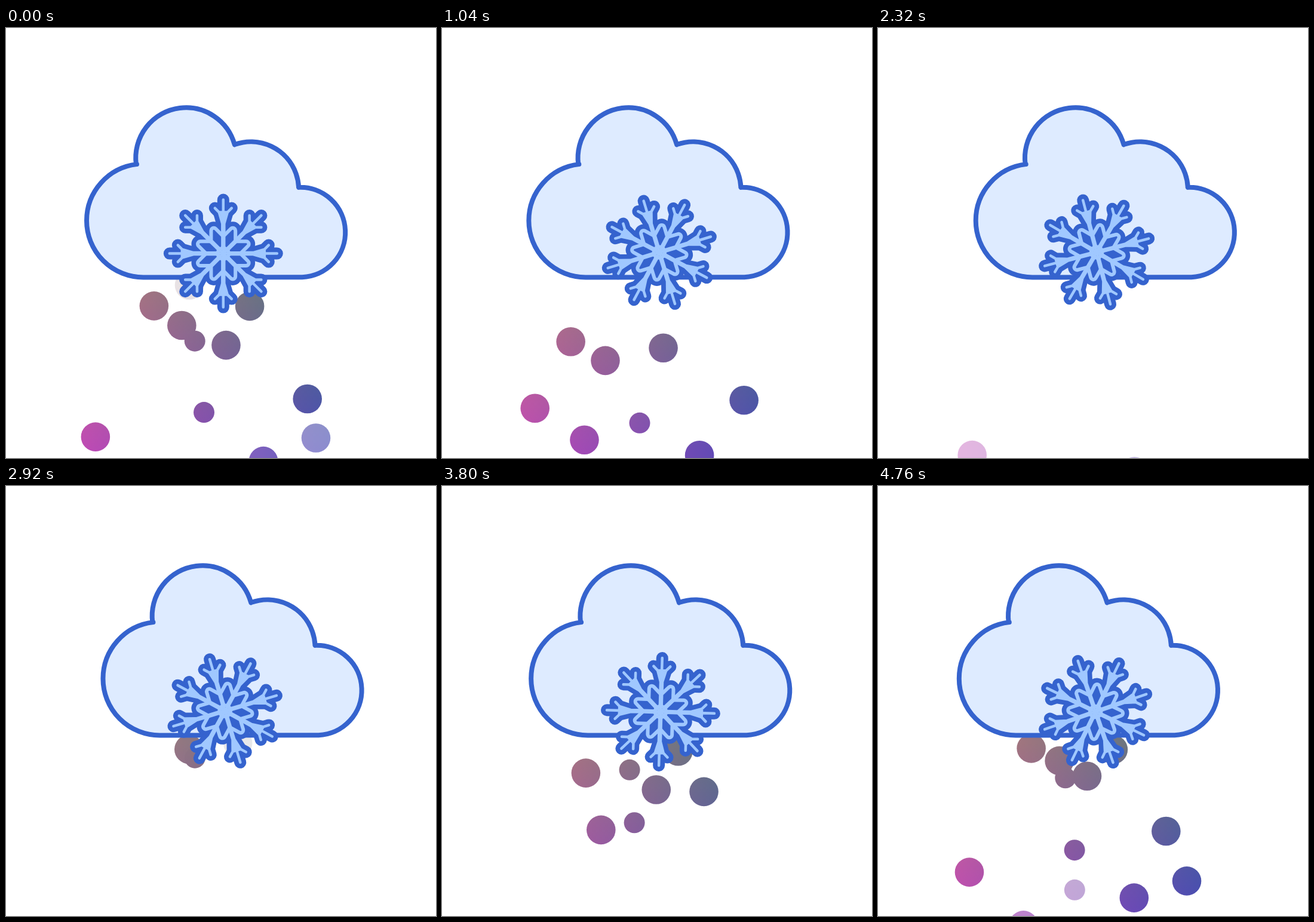
Write an HTML page with a canvas that moves like this. It is 720x720 px and loops after 4800 ms.

```html
<!DOCTYPE html>
<html lang="en">
<head>
<meta charset="utf-8">
<title>Snow cloud</title>
<style>
html, body { margin: 0; width: 100%; height: 100%; overflow: hidden; background: #fff; }
canvas { display: block; width: 720px; height: 720px; }
</style>
</head>
<body>
<canvas id="stage" width="720" height="720"></canvas>
<script>
const SIZE = 720, LOOP = 4800, STEP = 40;
const CYCLE = 5000, LAG = 25;   // the loop cuts a 5 s cycle short
const LIFE = 2500, FADE_IN = 300, FADE_OUT = 430, GONE = 2430;
const DARK = '#3563ce', LIGHT = '#a0c8ff', PALE = '#deebff';
const ctx = document.getElementById('stage').getContext('2d');
ctx.lineJoin = ctx.lineCap = 'round';

// y eases from top to bottom; x follows a Bezier curve over the same progress.
const track = (r, top, bottom, bend, births) => ({ r, top, bottom, bend, births });
const tracks = [
  track(24.3, 428, 722, [259, 243, 110, 161], [3080, 4420, 5040]),
  track(24.3, 430, 752, [307, 303, 207, 249], [2600, 4240, 4935]),
  track(17.5, 442, 684, [319, 299, 344, 328], [2520, 3170, 4010]),
  track(24.3, 430, 750, [336, 350, 450, 428], [2950, 4050, 5040]),
  track(24.3, 430, 699, [388, 432, 530, 518], [2845, 3405, 4405])
];

const ease = k => (1 - Math.cos(Math.PI * k)) / 2;
const bezier = ([a, b, c, d], k) => {
  const j = 1 - k;
  return j * j * j * a + 3 * j * j * k * b + 3 * j * k * k * c + k * k * k * d;
};

// Red runs across the stage, green and blue run down it.
function makeTint() {
  const c = document.createElement('canvas');
  c.width = c.height = SIZE;
  const g = c.getContext('2d');
  const wash = (x0, y0, x1, y1, from, to) => {
    const grad = g.createLinearGradient(x0, y0, x1, y1);
    grad.addColorStop(0, from);
    grad.addColorStop(1, to);
    g.fillStyle = grad;
    g.fillRect(0, 0, SIZE, SIZE);
  };
  wash(130, 0, 540, 0, 'rgb(190,0,0)', 'rgb(74,0,0)');
  g.globalCompositeOperation = 'lighter';
  wash(0, 430, 0, 710, 'rgb(0,117,127)', 'rgb(0,74,181)');
  return ctx.createPattern(c, 'no-repeat');
}
const tint = makeTint();

function drawSnow(t) {
  ctx.fillStyle = tint;
  for (const { r, top, bottom, bend, births } of tracks) {
    for (const birth of births) {
      const age = (t - birth + 2 * CYCLE) % CYCLE;
      if (age >= GONE) continue;
      const k = ease(age / LIFE);
      ctx.globalAlpha = Math.min(1, age / FADE_IN, (GONE - age) / FADE_OUT);
      ctx.beginPath();
      ctx.arc(bezier(bend, k), top + (bottom - top) * k, r, 0, 2 * Math.PI);
      ctx.fill();
    }
  }
  ctx.globalAlpha = 1;
}

const cloud = new Path2D();
cloud.arc(230, 322.5, 95, Math.PI / 2, -1.687);
cloud.arc(301.5, 217.7, 84.3, 3.016, -0.269);
cloud.arc(410, 270.6, 80.2, -1.914, -0.045);
cloud.arc(493, 342, 75.2, -1.61, Math.PI / 2);
cloud.closePath();

function drawCloud(t) {
  ctx.save();
  ctx.translate(29.2 * ease(2 * t / CYCLE), 0);
  ctx.fillStyle = PALE;
  ctx.strokeStyle = DARK;
  ctx.lineWidth = 8;
  ctx.fill(cloud);
  ctx.stroke(cloud);
  ctx.restore();
}

const arm = new Path2D('M0 0V-90M-14 -76L0 -62M14 -76L0 -62M0 -69H-7L-1.5 -50V-30H1.5V-50L7 -69Z');
const gem = new Path2D('M0 -13.5L-5.8 -27.5L0 -41.5L5.8 -27.5Z');

// Eight copies around the centre
function ring(shape, color, width, turn) {
  ctx.fillStyle = ctx.strokeStyle = color;
  ctx.lineWidth = width;
  for (let i = 0; i < 8; i++) {
    ctx.save();
    ctx.rotate((i + turn) * Math.PI / 4);
    ctx.fill(shape);
    ctx.stroke(shape);
    ctx.restore();
  }
}

function drawFlake(t) {
  ctx.save();
  ctx.translate(365.1, 376.7);
  ctx.rotate(2 * Math.PI * t / CYCLE);
  ctx.translate(-1.3, 0.9);
  ring(arm, DARK, 20, 0);
  ring(gem, DARK, 30, 0.5);
  ring(gem, LIGHT, 15, 0.5);
  ring(arm, LIGHT, 4.5, 0);
  ring(gem, DARK, 3, 0.5);
  ctx.restore();
}

function draw(now) {
  const t = Math.max(0, Math.floor(now % LOOP / STEP) * STEP - LAG);
  ctx.fillStyle = '#fff';
  ctx.fillRect(0, 0, SIZE, SIZE);
  drawSnow(t);
  drawCloud(t);
  drawFlake(t);
  requestAnimationFrame(draw);
}
draw(0);
</script>
</body>
</html>
```
